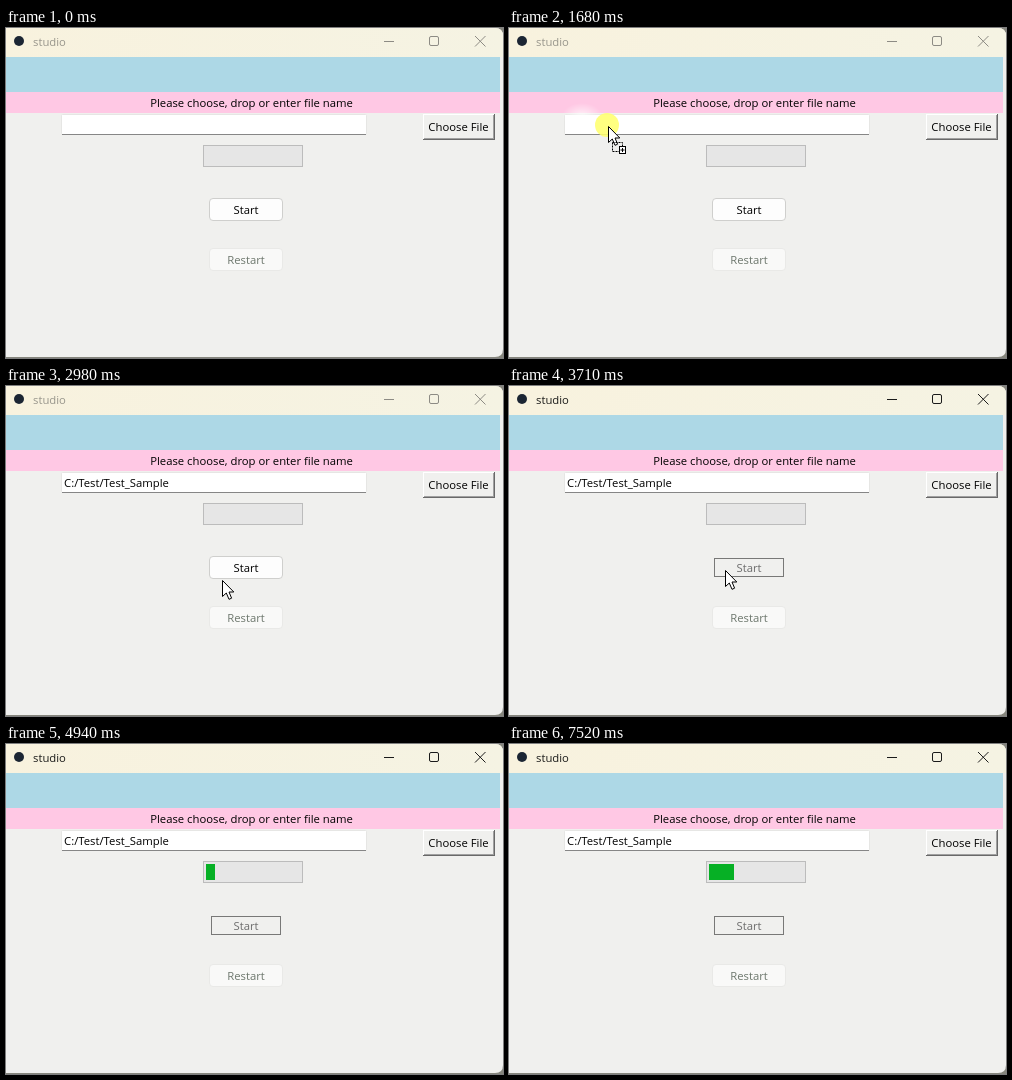
These frames come from a looping animation (497 by 330 pixels, 8000 ms). An HTML page:

```html
<!DOCTYPE html>
<html lang="en">
<head>
<meta charset="utf-8">
<title>studio</title>
<style>
html, body { margin: 0; width: 100%; height: 100%; overflow: hidden; background: #85857c; }
svg { display: block; width: 497px; height: 330px; }
text { font: 11.3px "Open Sans", "Noto Sans", sans-serif; fill: #000; }
.mid { text-anchor: middle; }
.off { fill: #6d776d; }
</style>
</head>
<body>
<svg viewBox="0 0 497 330">
  <defs>
    <linearGradient id="bar">
      <stop offset="0" stop-color="#f8f2de"/>
      <stop offset="1" stop-color="#f5f3e3"/>
    </linearGradient>
    <radialGradient id="glow">
      <stop offset="0" stop-color="#fff" stop-opacity=".75"/>
      <stop offset="1" stop-color="#fff" stop-opacity="0"/>
    </radialGradient>
    <clipPath id="frame"><path d="M0 0H489Q497 0 497 8V321Q497 329 489 329H0Z"/></clipPath>
  </defs>

  <g clip-path="url(#frame)">
    <rect width="497" height="330" fill="#f0f0ee"/>
    <rect width="497" height="29" fill="url(#bar)"/>
    <rect y="29" width="494" height="35" fill="#add8e6"/>
    <rect y="64" width="494" height="21" fill="#ffc8e4"/>
  </g>

  <circle cx="13" cy="13" r="5" fill="#1b2533"/>
  <text id="title" x="27" y="18">studio</text>
  <g id="controls" fill="none">
    <path d="M378 13.5H388"/>
    <rect x="423.5" y="8.5" width="9" height="9" rx="1.5"/>
    <path d="M469 8L479.500 18.500M479.500 8L469 18.500"/>
  </g>

  <text class="mid" x="245.500" y="79">Please choose, drop or enter file name</text>

  <rect x="55.5" y="86.5" width="305" height="20" rx="1" fill="#fff" stroke="#e6e6e4"/>
  <path d="M56 106.5H360" stroke="#868686"/>
  <text id="path" x="58" y="101">C:/Test/Test_Sample</text>

  <rect x="417" y="86" width="72" height="26" fill="#696969"/>
  <rect x="417" y="86" width="71" height="25" fill="#fff"/>
  <rect x="418" y="87" width="70" height="24" fill="#a0a0a0"/>
  <rect x="418" y="87" width="69" height="23" fill="#f0f0ee"/>
  <text class="mid" x="452.500" y="103">Choose File</text>

  <rect x="197.5" y="117.500" width="99" height="21" fill="#e6e6e6" stroke="#bcbcbc"/>
  <rect id="fill" x="200" y="120" height="16" fill="#06b025"/>

  <rect id="start" x="203.5" y="170.5" width="73" height="22" rx="3.500"/>
  <rect id="focus" x="205.5" y="172.5" width="69" height="18" fill="none" stroke="#000" stroke-dasharray="1 1"/>
  <text id="startText" class="mid" x="240" y="186">Start</text>

  <rect x="203.5" y="220.5" width="73" height="22" rx="3.500" fill="#f9f9f8" stroke="#e9e9e7"/>
  <text class="mid off" x="240" y="236">Restart</text>

  <ellipse id="trail" cx="73" cy="88" rx="20" ry="13" fill="url(#glow)"/>
  <circle id="spot" r="12" fill="#ffff6e" opacity=".88"/>

  <g id="drag">
    <rect x="-30.5" y="117.500" width="105" height="101" rx="3" fill="#fff" stroke="#3c3c3c"/>
    <rect x="-30.5" y="133.5" width="134" height="19" rx="3" fill="#f9f9fc" stroke="#dcdce0"/>
    <path d="M0 140.500L3 143L0 145.500Z" fill="#222"/>
    <text x="7" y="147" fill="#000"><tspan fill="#1a4fc0">Move to</tspan> <tspan fill="#10207a">Desktop</tspan></text>
  </g>

  <g id="cursor">
    <path d="M.5 .5V16.500L4.300 13L7 19.300L9.600 18.200L7 12H11.800Z" fill="#fff" stroke="#000"/>
    <g id="copy" fill="none" stroke="#000">
      <rect x="4.500" y="16.500" width="10" height="9" stroke-dasharray="2 1"/>
      <rect x="11.500" y="20.500" width="6" height="7" fill="#fff"/>
      <path d="M12.500 24H16.500M14.500 22V26"/>
    </g>
  </g>
</svg>
<script>
const LOOP = 8000;
const $ = id => document.getElementById(id);
const show = (id, on) => $(id).setAttribute('visibility', on ? 'visible' : 'hidden');
const set = (id, attrs) => { for (const k in attrs) $(id).setAttribute(k, attrs[k]); };
const smooth = p => p * p * (3 - 2 * p);

// Quadratic curve through a, c and b, with c reached halfway
const arc = (a, c, b, p) => a.map((v, i) => {
  const mid = 2 * c[i] - (v + b[i]) / 2, q = 1 - p;
  return q * q * v + 2 * q * p * mid + p * p * b[i];
});

// The pointer is sampled in discrete ticks
const ticks = (t, from, gap, max) => Math.min(max, Math.floor((t - from) / gap));

function pointer(t) {
  if (t < 1260 || t >= 4480) return null;
  if (t < 2080) return arc([-8, 119], [62, 80], [99, 98], ticks(t, 1260, 70, 6) / 6);
  if (t < 2280) return [99, 98];
  if (t < 3050) {
    const p = smooth((ticks(t, 2280, 70, 10) + 1) / 11);
    return arc([99, 98], [168, 142], [216, 194], p);
  }
  if (t < 3130) return [216, 189];
  if (t < 3710) return [216, 185];
  const p = ticks(t, 3710, 77, 9) / 9;
  return arc([216, 184], [210, 213], [143, 261], p * p * .6 + p * .4);
}

const barSteps = [[3870, 3], [4410, 6], [4940, 9], [5400, 12], [5930, 16], [6460, 19], [6990, 22], [7520, 25]];

const looks = {
  idle: ['#fdfdfd', '#cfcfcd', '#000'],
  hover: ['#e0eef9', '#0078d4', '#000'],
  down: ['#cce4f7', '#005499', '#000'],
  fading: ['#e3ebf0', '#a9bccb', '#6d6d6d'],
  off: ['#f0f0ee', '#f0f0ee', '#6d6d6d']
};

function look(t) {
  if (t < 3050) return looks.idle;
  if (t < 3130) return looks.hover;
  if (t < 3260) return looks.down;
  return t < 3320 ? looks.fading : looks.off;
}

function draw(t) {
  const active = t >= 3130;
  $('title').style.fill = active ? '#1c1c1a' : '#98968c';
  set('controls', { stroke: active ? '#1a1a1a' : '#8d8b84' });

  const pos = pointer(t);
  const carrying = t >= 1260 && t < 2080;
  const pressed = t >= 3130 && t < 3260;
  show('drag', t >= 1260 && t < 1330);
  show('trail', t >= 1680 && t < 2080);
  show('copy', carrying && t >= 1330);
  show('cursor', pos && t >= 1330);
  if (!(pos && t >= 1330)) show('copy', false);
  show('spot', carrying || pressed);
  if (pos) {
    const [x, y] = pos.map(Math.round);
    set('cursor', { transform: `translate(${x} ${y})` });
    set('spot', { cx: x - 1, cy: y - 1 });
  }

  show('path', t >= 2080);
  const [fill, stroke, ink] = look(t);
  set('start', { fill, stroke });
  $('startText').style.fill = ink;
  show('focus', t >= 3130);

  let width = 0;
  for (const [at, w] of barSteps) if (t >= at) width = w;
  set('fill', { width });
}

const begin = performance.now();
function tick() {
  draw((performance.now() - begin) % LOOP);
  requestAnimationFrame(tick);
}
draw(0);
requestAnimationFrame(tick);
</script>
</body>
</html>
```
